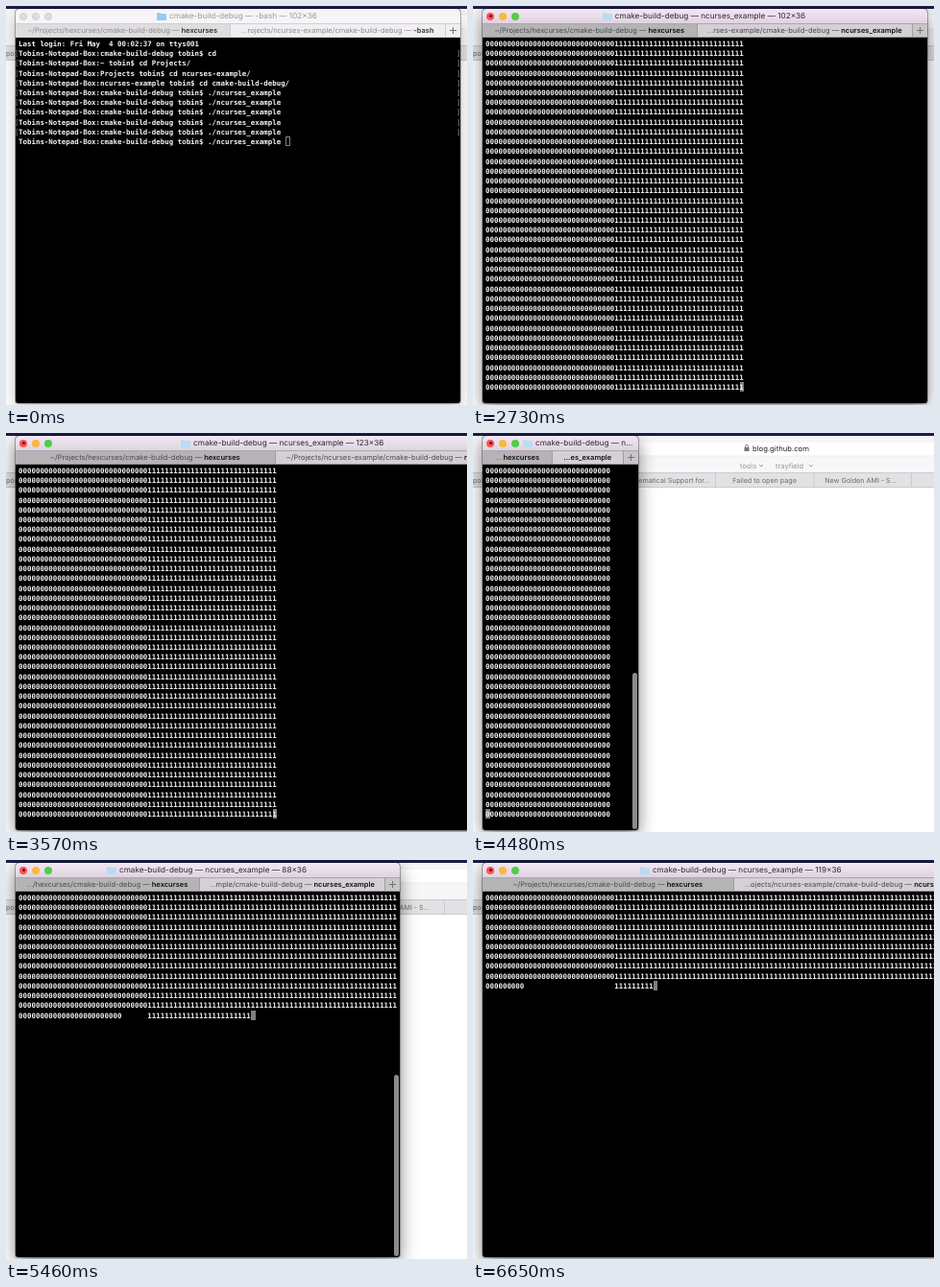
Animation, 480 px wide and 416 px high, one loop 7210 ms. Source, as an HTML page:

```html
<!DOCTYPE html>
<html lang="en">
<head>
<meta charset="utf-8">
<title>Terminal resize</title>
<style>
  html, body { margin: 0; width: 100%; height: 100%; overflow: hidden; background: #fff; }
  #stage {
    position: relative; width: 480px; height: 416px; overflow: hidden; background: #fff;
    font: 7.5px Inter, Roboto, sans-serif; text-rendering: geometricPrecision;
  }
  #browser { position: absolute; left: 0; top: 0; }
  #win {
    position: absolute; left: 10px; top: 3px; height: 411px; overflow: hidden;
    background: #000; border-radius: 4px 4px 3px 3px;
  }
  #win * { position: absolute; box-sizing: border-box; white-space: pre; }
  #bar { left: 0; top: 0; width: 100%; height: 15px; background: linear-gradient(#f3e7f4, #dfd3e1); }
  .light { top: 3.5px; width: 8px; height: 8px; border-radius: 50%; }
  .light:nth-child(1) { left: 4.3px; background: #fb5558; }
  .light:nth-child(2) { left: 17.3px; background: #f9b83c; }
  .light:nth-child(3) { left: 30.2px; background: #4fcd4b; }
  .run .light:nth-child(1)::after {
    content: ""; position: absolute; left: 2.5px; top: 2.5px;
    width: 3px; height: 3px; border-radius: 50%; background: #6d0c10;
  }
  #title { top: 0; height: 15px; }
  #name { left: 13px; top: 0; font-size: 8.2px; line-height: 15px; color: #2c2a2d; }
  #folder { left: 0; top: 5px; width: 10px; height: 7px; border-radius: 1px; background: #79c3ee; }
  #folder::before {
    content: ""; position: absolute; left: 0; top: -1px; width: 4px; height: 2px;
    border-radius: 1px; background: inherit;
  }
  .run #folder { background: #b9dcf2; }
  .tab, #plus {
    top: 15px; height: 15px; line-height: 15px; color: #4c4a4d;
    border-top: 1px solid #aaa6ab; border-bottom: 1px solid #8f8c90;
  }
  .tab { background: #b6b3b7; }
  #tab2 { background: #d4d0d5; border-left: 1px solid #a09da1; }
  .label { left: 50%; top: -1px; transform: translateX(-50%); }
  .label * { position: static !important; }
  .label b { font-weight: 600; color: #111; }
  #plus { right: 0; width: 16px; background: #c9c6ca; border-left: 1px solid #a09da1; }
  #plus::before, #plus::after { content: ""; position: absolute; background: #737174; }
  #plus::before { left: 4px; top: 6px; width: 7px; height: 1px; }
  #plus::after { left: 7px; top: 3px; width: 1px; height: 7px; }
  .idle #bar { background: #f6f4f7; }
  .idle .light { background: #dedcdf; border: 1px solid #cfcdd0; }
  .idle #name { color: #9b999c; }
  .idle #folder { background: #93cdf0; }
  .idle .tab { background: #dfdde0; color: #8d8b8e; border-color: #d0ced1; }
  .idle #tab2, .idle #plus { background: #f1eff2; border-color: #d0ced1; }
  .idle .label b { color: #333; }
  pre {
    margin: 0; top: 31.8px; left: 3px; color: #f4f4f4;
    font: bold 7.447px/10.23px "DejaVu Sans Mono", "Liberation Mono", monospace;
  }
  pre.mark { color: #8a8a8a; font-weight: normal; }
  #cursor { width: 4.5px; height: 10.2px; background: #7f7f7f; }
  .idle #cursor { background: none; border: 1px solid #7f7f7f; }
  #scroll { right: 1px; width: 5px; bottom: 1.5px; border-radius: 3px; background: #8b8b8b; }
</style>
</head>
<body>
<div id="stage">
  <svg id="browser" width="480" height="416" font-size="7.15" fill="#6b6b6b">
    <rect y="3" width="480" height="38" fill="#f7f6f8"/>
    <rect x="80" y="9" width="420" height="15" rx="3" fill="#fff" stroke="#e6e4e8" stroke-width=".6"/>
    <rect y="41" width="480" height="16" fill="#e2e1e3"/>
    <path d="M0 41.5H480M0 56.5H480M48.500 41V57M150.500 41V57M252.500 41V57M355 41V57M456.500 41V57"
      stroke="#cbcacc" fill="none"/>
    <rect x="282.500" y="15" width="5" height="4" rx=".6" fill="#777"/>
    <path d="M283.500 15V13.800a1.500 1.500 0 0 1 3 0V15" fill="none" stroke="#777" stroke-width=".9"/>
    <text x="291" y="18.700" font-size="7.7" fill="#222">blog.github.com</text>
    <g fill="#999" font-size="7.5">
      <text x="278" y="36.800">tools</text>
      <text x="315" y="36.800">trayfield</text>
    </g>
    <path d="M298 33l2 2 2-2M350 33l2 2 2-2" fill="none" stroke="#999" stroke-width=".9"/>
    <text x="0" y="51.800">posts</text>
    <g text-anchor="middle">
      <text x="201" y="51.800">Mathematical Support for...</text>
      <text x="303.500" y="51.800">Failed to open page</text>
      <text x="403.500" y="51.800">New Golden AMI - S...</text>
    </g>
    <rect width="480" height="3" fill="#1c1b47"/>
  </svg>
  <div id="win">
    <div id="bar">
      <i class="light"></i><i class="light"></i><i class="light"></i>
      <div id="title"><i id="folder"></i><span id="name"></span></div>
    </div>
    <div id="tab1" class="tab"><span class="label"><span></span><b></b></span></div>
    <div id="tab2" class="tab"><span class="label"><span></span><b></b></span></div>
    <div id="plus"></div>
    <div id="cursor"></div>
    <pre id="text"></pre>
    <pre class="mark" style="left:-1px"></pre>
    <pre class="mark" style="left:459px"></pre>
    <div id="scroll"></div>
  </div>
</div>
<script>
const LOOP = 7210, STEP = 70, CELLS = 36 * 30;
const CHAR = 4.484, LINE = 10.23, PLUS = 16;
const $ = id => document.getElementById(id);
const win = $('win'), marks = document.querySelectorAll('.mark');

// [time, columns]
const drag = [
  [2730, 102], [3430, 126], [3570, 123], [3990, 29], [4060, 35], [4480, 35],
  [5180, 84], [5460, 88], [5950, 106], [6090, 106], [6440, 119]
];

const prompt = (dir, cmd) => `Tobins-Notepad-Box:${dir} tobin$ ${cmd}`;
const shell = [
  'Last login: Fri May  4 00:02:37 on ttys001',
  prompt('cmake-build-debug', 'cd'),
  prompt('~', 'cd Projects/'),
  prompt('Projects', 'cd ncurses-example/'),
  prompt('ncurses-example', 'cd cmake-build-debug/'),
  ...Array(6).fill(prompt('cmake-build-debug', './ncurses_example'))
].join('\n');

function columns(t) {
  if (t <= drag[0][0]) return drag[0][1];
  const i = drag.findIndex(k => k[0] >= t);
  if (i < 0) return drag[drag.length - 1][1];
  const [t0, a] = drag[i - 1], [t1, b] = drag[i];
  return Math.round(a + (b - a) * (t - t0) / (t1 - t0));
}

const row = (zeros, ones) => '0'.repeat(zeros).padEnd(30) + '1'.repeat(Math.max(0, ones));

// Terminal contents with the cursor as [column, row]
function screen(t, cols) {
  if (t < 1260) return [shell, 62, 10];
  if (t < 1400) return ['', 0, 0];
  if (t < 3990) {
    const shown = Math.min(60, cols);
    return [Array(36).fill(row(Math.min(30, shown), shown - 30)).join('\n'), shown - 1, 35];
  }
  if (t <= 4480) return [Array(36).fill(row(29, 0)).join('\n'), 0, 35];
  const full = Math.floor(CELLS / cols), rest = CELLS % cols;
  const ones = Math.min(rest, cols - 30);
  const lines = Array(full).fill(row(30, cols - 30));
  lines.push(row(Math.min(rest, 30), ones));
  return [lines.join('\n'), Math.min(30 + ones, cols - 1), full];
}

// Drops characters until the element is no wider than max
function fit(el, max, fill) {
  let cut = 0;
  do fill(cut); while (el.getBoundingClientRect().width > max && ++cut < 70);
}

function setTab(id, left, width, path, proc) {
  const tab = $(id), label = tab.firstChild, [lead, bold] = label.children;
  tab.style.left = left + 'px';
  tab.style.width = width + 'px';
  fit(label, width - 21, cut => {
    const dots = cut ? '...' : '', n = cut ? cut + 2 : 0;
    const inPath = n < path.length;
    lead.textContent = inPath ? dots + path.slice(n) : '';
    bold.textContent = inPath ? proc : dots + proc.slice(n - path.length);
  });
}

function setTitle(width, text) {
  const name = $('name');
  fit(name, width - 58, cut => {
    name.textContent = cut ? text.slice(0, -cut - 2) + '...' : text;
  });
  const group = 13 + name.getBoundingClientRect().width;
  $('title').style.left = Math.max(42, (width - group) / 2 - 1) + 'px';
}

function draw(t) {
  const cols = columns(t), width = cols * 4.5 + 4;
  const proc = t < 1400 ? '-bash' : 'ncurses_example';
  const glow = Math.min(1, Math.max(0, (t - 140) / 210));

  win.className = t < 210 ? 'idle' : t < 1470 ? '' : 'run';
  win.style.width = width + 'px';
  win.style.boxShadow =
    `0 0 0 1px rgba(0,0,0,.3), 0 6px 18px rgba(0,0,0,${0.25 + 0.25 * glow})`;

  setTitle(width, `cmake-build-debug — ${proc} — ${cols}×36`);
  const split = Math.min((width - PLUS) / 2, 72) + Math.max(0, width / 2 - 81);
  const edge = Math.min(split, width / 2 - 1);
  setTab('tab1', 0, edge, '~/Projects/hexcurses/cmake-build-debug — ', 'hexcurses');
  setTab('tab2', edge, width - PLUS - edge, '~/Projects/ncurses-example/cmake-build-debug — ', proc);

  const [text, x, y] = screen(t, cols);
  $('text').textContent = text;
  $('cursor').style.left = 3 + x * CHAR + 'px';
  $('cursor').style.top = 30.8 + y * LINE + 'px';
  marks.forEach((m, i) => {
    m.textContent = t < 1260 ? '\n' + ('[]'[i] + '\n').repeat(9) : '';
  });

  const bar = $('scroll').style;
  bar.display = t >= 3500 ? 'block' : 'none';
  bar.height = 163 + (cols - 35) * 0.48 + 'px';
}

const start = performance.now();
let last = -1;
function tick() {
  const t = Math.floor((performance.now() - start) % LOOP / STEP) * STEP;
  if (t !== last) draw(last = t);
  requestAnimationFrame(tick);
}
tick();
</script>
</body>
</html>
```
